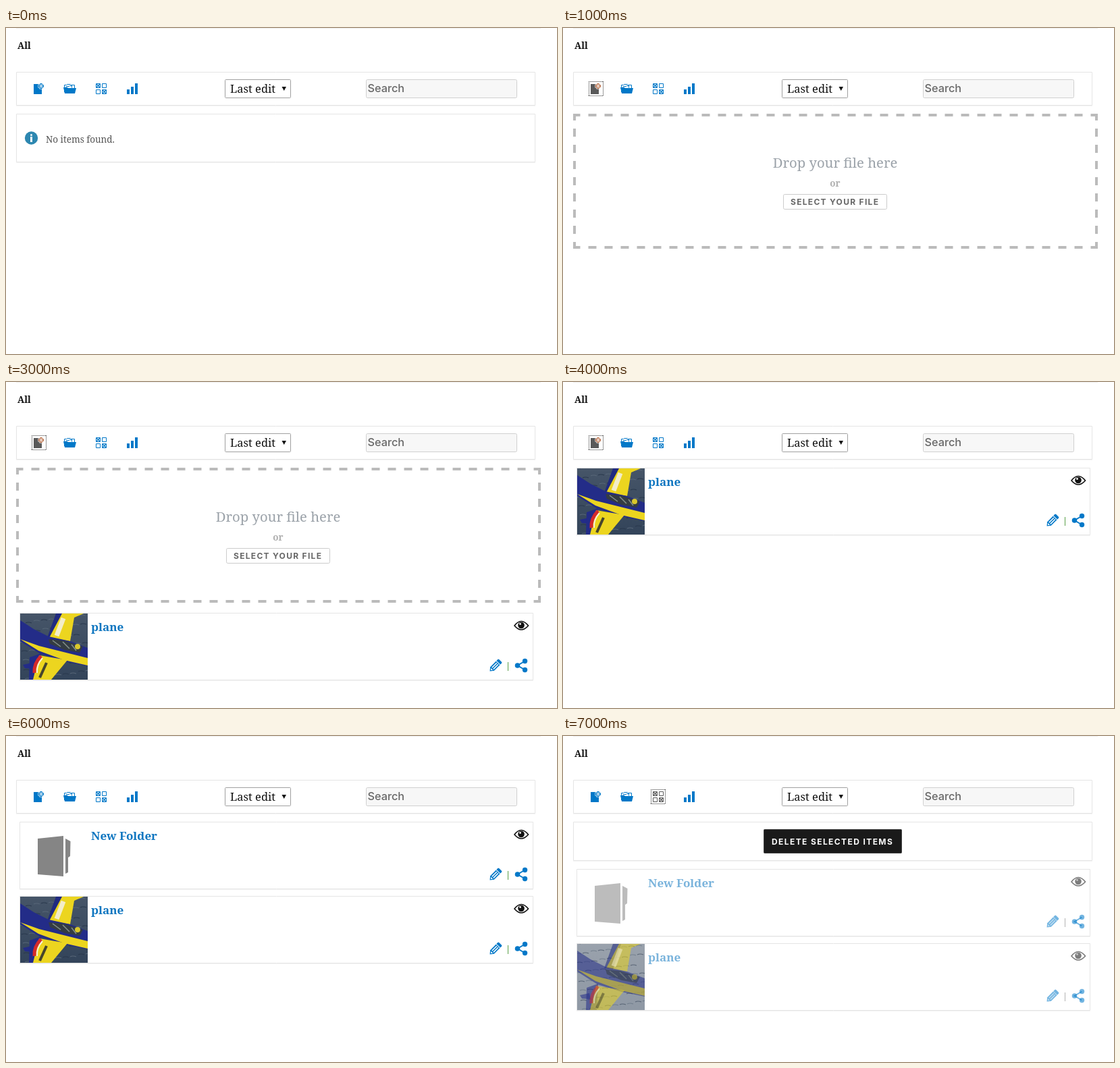
An HTML page with a canvas for the animation above (8 s loop, 816 px wide and 483 px high).

```html
<!DOCTYPE html>
<html lang="en">
<head>
<meta charset="utf-8">
<title>File manager</title>
<style>
html, body { margin: 0; width: 100%; height: 100%; overflow: hidden; background: #fff; }
canvas { display: block; }
</style>
</head>
<body>
<canvas id="stage" width="816" height="483"></canvas>
<script>
const ctx = document.getElementById('stage').getContext('2d');
const SERIF = '"Noto Serif", serif';
const SANS = 'Inter, sans-serif';
const BLUE = '#0078c8';
const GREY = '#5a5a5a';

function text(str, x, y, font, color, { align = 'left', spacing = 0 } = {}) {
  ctx.font = font;
  ctx.fillStyle = color;
  ctx.textAlign = align;
  ctx.letterSpacing = spacing + 'px';
  ctx.fillText(str, x, y);
  ctx.letterSpacing = '0px';
}

function fill(color, x, y, w, h) {
  ctx.fillStyle = color;
  ctx.fillRect(x, y, w, h);
}

function poly(color, ...points) {
  ctx.beginPath();
  for (let i = 0; i < points.length; i += 2) ctx.lineTo(points[i], points[i + 1]);
  ctx.closePath();
  ctx.fillStyle = color;
  ctx.fill();
}

function line(color, width, path) {
  ctx.strokeStyle = color;
  ctx.lineWidth = width;
  ctx.stroke(new Path2D(path));
}

function disc(color, x, y, r) {
  ctx.beginPath();
  ctx.arc(x, y, r, 0, Math.PI * 2);
  ctx.fillStyle = color;
  ctx.fill();
}

// Box with a crisp one pixel border; w and h include the border.
function box(x, y, w, h, border, background = '#fff', radius = 0) {
  ctx.beginPath();
  ctx.roundRect(x + 0.5, y + 0.5, w - 1, h - 1, radius);
  ctx.fillStyle = background;
  ctx.fill();
  ctx.strokeStyle = border;
  ctx.lineWidth = 1;
  ctx.stroke();
}

function panel(x, y, w, h) {
  fill('#f3f3f3', x, y + h, w, 1);
  box(x, y, w, h, '#e5e5e5');
}

function focusRing(x) {
  ctx.setLineDash([1, 1]);
  line('#333', 1, `M${x} 79.5h22M${x} 100.5h22M${x + 0.5} 79v22M${x + 21.5} 79v22`);
  ctx.setLineDash([]);
}

function addIcon(active) {
  fill(active ? GREY : BLUE, 41, 83, 12, 15);
  line('#fff', 5, 'M52 81.5v9M47.5 86h9');
  line(active ? '#b5673f' : BLUE, 3.4, 'M52 82v8M48 86h8');
  line('#fff', 1.2, 'M52 83v6M49 86h6');
  if (active) focusRing(38);
}

function folderIcon() {
  line(BLUE, 1, 'M86.5 95V84.5h3l1-1h5l1 1h5V89M88.5 89l1-2.5h4l1-1h3v3');
  poly(BLUE, 85, 88, 91, 88, 92, 89, 104, 89, 102, 97, 87, 97);
}

function gridIcon(active) {
  const color = active ? GREY : BLUE;
  line(color, 1, 'M133.5 82.5h6v6h-6zM142.5 82.5h6v6h-6zM133.5 91.5h6v6h-6zM142.5 91.5h6v6h-6z');
  line(color, 1.2, 'M134 83l5 5m0-5l-5 5M143 92l5 5m0-5l-5 5');
  if (active) focusRing(130);
}

function toolbar(active) {
  fill('#f0f0f0', 15, 0, 777, 1);
  text('All', 17, 31, `bold 13.5px ${SERIF}`, '#111');
  panel(15, 65, 769, 50);
  addIcon(active === 'add');
  folderIcon();
  gridIcon(active === 'grid');
  fill(BLUE, 179, 91, 4, 7);
  fill(BLUE, 185, 87, 4, 11);
  fill(BLUE, 191, 82, 4, 16);

  box(324, 76, 98, 28, '#a0a0a0', '#fff', 1);
  text('Last edit', 332, 96, `16.5px ${SERIF}`, '#111');
  poly('#111', 408.5, 87, 415, 87, 411.75, 93);

  box(533, 76, 224, 28, '#d0d0d0', '#f7f7f7', 2);
  text('Search', 535.5, 95, `500 16.3px ${SANS}`, '#686868');
}

function emptyPanel() {
  panel(15, 127, 769, 72);
  disc('#2d87b0', 37.5, 163, 9.7);
  disc('#fff', 37.5, 158.5, 1.5);
  fill('#fff', 36, 161, 3, 8);
  text('No items found.', 59, 170, `13.5px ${SERIF}`, '#555');
}

function dashedFrame(color) {
  ctx.setLineDash([12, 12]);
  ctx.lineDashOffset = 5.5;
  line(color, 4, 'M19 129h769M19 325h769');
  ctx.lineDashOffset = 6;
  line(color, 4, 'M17 131v192M790 131v192');
  ctx.setLineDash([]);
  ctx.lineDashOffset = 0;
  for (const x of [15, 788]) for (const y of [127, 323]) fill(color, x, y, 4, 4);
}

function dropZone(color) {
  dashedFrame(color);
  text('Drop your file here', 403, 207, `20.3px ${SERIF}`, '#9ba2a9', { align: 'center' });
  text('or', 403, 235, `bold 13.5px ${SERIF}`, '#b0b0b0', { align: 'center' });
  box(326, 246, 154, 23, '#ccc', '#fff', 2);
  text('SELECT YOUR FILE', 337, 262, `700 12px ${SANS}`, '#666', { spacing: 1.3 });
}

// Aeroplane above the sea, drawn in a 100 by 98 field.
function photo(x, y, scaleX = 1, scaleY = 1) {
  ctx.save();
  ctx.translate(x, y);
  ctx.scale(scaleX, scaleY);
  ctx.beginPath();
  ctx.rect(0, 0, 100, 98);
  ctx.clip();
  const sea = ctx.createLinearGradient(0, 0, 0, 98);
  sea.addColorStop(0, '#465568');
  sea.addColorStop(1, '#33445a');
  fill(sea, 0, 0, 100, 98);
  for (let i = 0; i < 60; i++) {
    line(i % 2 ? '#586779' : '#2a394d', 1.2, `M${(i * 37) % 103 - 4} ${(i * 23) % 98}q4 -2 9 0`);
  }
  poly('#202a80', 53, 0, 65, 0, 53, 38, 40, 36);
  poly('#ecd51f', 62, 0, 94, 0, 80, 6, 74, 41, 43, 36);
  line('#f3edc8', 7, 'M64 7L54 33');
  poly('#232c88', 0, 10, 20, 23, 42, 34, 74, 41, 100, 51, 100, 78, 66, 71, 30, 60, 0, 41);
  poly('#ecd51f', 0, 38, 28, 48, 100, 66, 100, 77, 65, 69, 27, 55);
  poly('#343c42', 42, 38, 64, 40, 93, 49, 88, 58, 66, 54, 44, 45);
  line('#83908b', 1.5, 'M48 40l12 9M63 42l10 10M76 46l7 9');
  disc('#d9c72c', 85, 49, 4);
  poly('#232c88', 4, 76, 18, 73, 20, 82, 7, 81);
  poly('#232c88', 14, 65, 31, 59, 29, 98, 13, 98);
  poly('#ecd51f', 28, 62, 70, 69, 46, 98, 19, 98);
  line('#d5292b', 5, 'M31 63Q20 74 21 88');
  line('#f4f0df', 2, 'M33 66Q24 76 25 88');
  line('#46452c', 4, 'M39 73L29 95');
  ctx.restore();
}

function dragGhost() {
  ctx.globalAlpha = 0.65;
  photo(568, 202, 0.45, 30 / 98);
  ctx.globalAlpha = 1;
  ctx.shadowColor = '#666';
  ctx.shadowBlur = 2;
  ctx.shadowOffsetX = ctx.shadowOffsetY = 1;
  text('plane.jpg', 568, 251, '11px "Noto Sans", sans-serif', '#fff');
  ctx.shadowColor = 'transparent';
  const glass = ctx.createLinearGradient(0, 224, 0, 244);
  glass.addColorStop(0, '#fff');
  glass.addColorStop(1, '#e4e5f0');
  box(598, 224, 68, 20, '#767676', glass, 2.5);
  line('#0b4fae', 4, 'M607.5 228v12M601.5 234h12');
  line('#2f9be8', 2, 'M607.5 229v10M602.5 234h10');
  text('la copie', 618, 238, '10.7px "DejaVu Sans", sans-serif', '#1414c8');
}

function eyeIcon(y) {
  line('#111', 1.6, `M753 ${y}Q763 ${y - 13} 773.5 ${y}Q763 ${y + 12} 753 ${y}z`);
  disc('#111', 763, y - 0.5, 4.8);
  disc('#fff', 761.5, y - 2.5, 1.4);
}

function pencilIcon(y) {
  ctx.save();
  ctx.translate(716.5, y + 8.5);
  ctx.rotate(-Math.PI / 4);
  poly(BLUE, 0, 0, 5, -4, 21, -4, 22, -3, 22, 3, 21, 4, 5, 4);
  fill('#fff', 6, -2.2, 10, 1.5);
  fill('#fff', 6, 0.8, 10, 1.5);
  fill('#fff', 17, -4, 1, 8);
  poly('#fff', 2, 0, 4.5, -2, 4.5, 2);
  ctx.restore();
}

function shareIcon(y) {
  line(BLUE, 2, `M768.5 ${y - 6.5}L757.5 ${y}L768.5 ${y + 6.5}`);
  disc(BLUE, 757.5, y, 3.8);
  disc(BLUE, 768.5, y - 6.5, 3.7);
  disc(BLUE, 768.5, y + 6.5, 3.7);
}

function folderPicture(y) {
  poly('#858585', 47, y + 25, 85, y + 21, 85, y + 81, 47, y + 78);
  poly('#858585', 88, y + 25, 95.5, y + 29, 95, y + 51, 92, y + 53, 92, y + 75, 88, y + 77);
}

function item(name, y, { divider = '#5aa04a', alpha = 1 } = {}) {
  panel(20, y, 761, 100);
  ctx.globalAlpha = alpha;
  if (name === 'plane') photo(21, y + 1);
  else folderPicture(y);
  text(name, 126, y + 27, `bold 17px ${SERIF}`, '#0f76c0');
  eyeIcon(y + 19);
  pencilIcon(y + 78);
  fill(divider, 743, y + 73, 1, 13);
  shareIcon(y + 78);
  ctx.globalAlpha = 1;
}

function folderForm() {
  panel(15, 127, 769, 64);
  box(26, 138, 298, 42, BLUE, '#fff', 2);
  text('New Folder', 34, 165, `16px ${SERIF}`, '#1a1a1a');
  box(333, 143, 143, 36, '#8a8a8a', '#434343', 1);
  text('CREATE FOLDER', 345, 166, `700 12px ${SANS}`, '#fff', { spacing: 1.45 });
}

function deletePanel() {
  panel(15, 127, 769, 58);
  box(297, 138, 205, 36, '#444', '#1a1a1a', 1);
  text('DELETE SELECTED ITEMS', 309, 161, `700 12px ${SANS}`, '#fff', { spacing: 1.4 });
}

const IDLE = '#bbb';
const HOVER = '#80b4e1';
const faded = { divider: '#777', alpha: 0.55 };

// One scene per second.
const scenes = [
  () => { toolbar(); emptyPanel(); },
  () => { toolbar('add'); dropZone(IDLE); },
  () => { toolbar('add'); dropZone(HOVER); dragGhost(); },
  () => { toolbar('add'); dropZone(IDLE); item('plane', 342); },
  () => { toolbar('add'); item('plane', 127); },
  () => { toolbar(); folderForm(); item('plane', 203, { divider: '#777' }); },
  () => { toolbar(); item('New Folder', 127); item('plane', 237); },
  () => { toolbar('grid'); deletePanel(); item('New Folder', 197, faded); item('plane', 307, faded); },
];

const start = performance.now();

function draw() {
  const elapsed = performance.now() - start;
  fill('#fff', 0, 0, 816, 483);
  scenes[Math.floor(elapsed / 1000) % scenes.length]();
  requestAnimationFrame(draw);
}
draw();
</script>
</body>
</html>
```
